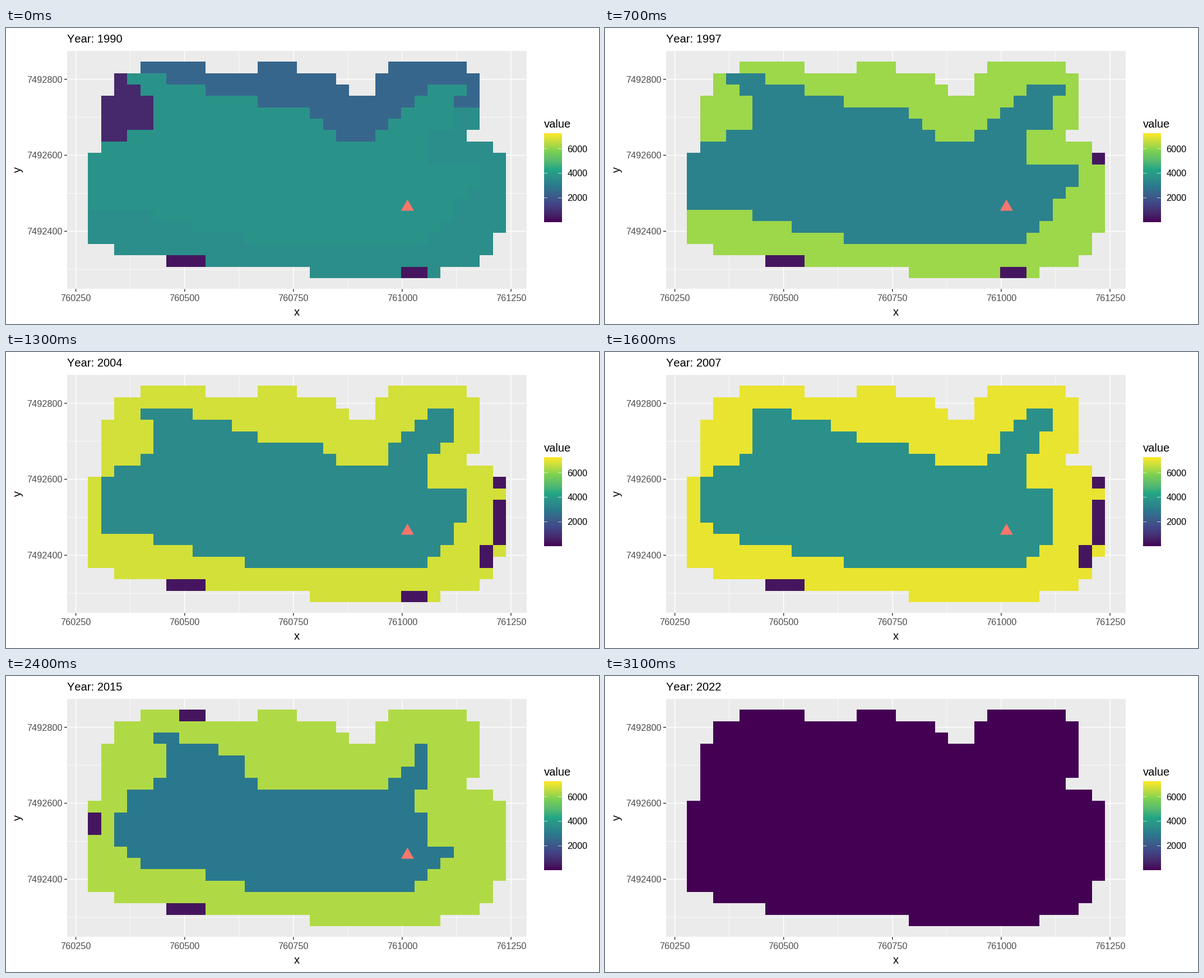
These frames come from a looping animation (1058x529 px, 3.2 s). A matplotlib script:

```python
import numpy as np
import matplotlib.pyplot as plt
from matplotlib.animation import FuncAnimation
from matplotlib.colors import ListedColormap, to_rgb
from matplotlib.patches import Polygon, Rectangle
from matplotlib.path import Path

W, H, DPI = 1058, 529, 100
PT = 72 / DPI  # points per pixel
VMAX = 7225
ROWS, COLS = 19, 32
YEARS = [y for y in range(1990, 2023) if y != 2002]

plt.rcParams["font.family"] = "Liberation Sans"
plt.rcParams["text.kerning_factor"] = 6

# ---- colour scale: viridis stops blended in Lab space ----
STOPS = ["#440154", "#414487", "#2A788E", "#22A884", "#7AD151", "#FDE725"]
TO_XYZ = np.array([[0.4124, 0.3576, 0.1805],
                   [0.2126, 0.7152, 0.0722],
                   [0.0193, 0.1192, 0.9505]])
WHITE = TO_XYZ.sum(axis=1)
TO_LAB = np.array([[0, 116, 0], [500, -500, 0], [0, 200, -200]])


def rgb_to_lab(rgb):
    lin = np.where(rgb > 0.04045, ((rgb + 0.055) / 1.055) ** 2.4, rgb / 12.92)
    t = lin @ TO_XYZ.T / WHITE
    f = np.where(t > 0.008856, np.cbrt(t), 7.787 * t + 16 / 116)
    return f @ TO_LAB.T


def lab_to_rgb(lab):
    f = lab @ np.linalg.inv(TO_LAB).T
    t = np.where(f > 0.2069, f ** 3, (f - 16 / 116) / 7.787)
    lin = np.clip((t * WHITE) @ np.linalg.inv(TO_XYZ).T, 0, 1)
    rgb = np.where(lin > 0.0031308, 1.055 * lin ** (1 / 2.4) - 0.055, 12.92 * lin)
    return np.clip(rgb, 0, 1)


def viridis_ramp(n=1024):
    labs = rgb_to_lab(np.array([to_rgb(c) for c in STOPS]))
    pos = np.linspace(0, 1, len(STOPS))
    t = np.linspace(0, 1, n)
    lab = np.stack([np.interp(t, pos, labs[:, k]) for k in range(3)], axis=1)
    return ListedColormap(lab_to_rgb(lab))


CMAP = viridis_ramp()

# ---- map model, in cell units ----
COL, ROW = np.meshgrid(np.arange(COLS), np.arange(ROWS))
CENTRES = np.column_stack([COL.ravel(), ROW.ravel()]) + 0.5

# Outline of the whole area.
OUTLINE = [
    (0, 8.4), (1, 7.6), (1, 3.4), (2, 2.6), (2, 1.4), (4, 0.3), (9, 0.3),
    (9, 0.9), (13, 0.9), (13, 0.3), (16, 0.3), (16, 0.9), (18.7, 0.9),
    (20.2, 2.9), (22, 2.9), (22, 1.5), (23, 0.3), (28.9, 0.3), (30, 1.5),
    (30, 5.5), (29, 6.5), (31, 7.5), (32, 8.4), (32, 14.5), (30.9, 16.6),
    (30, 17.5), (26.9, 18.6), (18, 18.6), (6.4, 17.5), (2, 16.5), (0, 15.5),
]

# Shore of the core: each point with its place at high and at low level.
SHORE = np.array([
    (0, 8.4, 2, 9.4), (0, 12.6, 2, 11.5), (5, 13.5, 3.9, 13.6),
    (8, 14.5, 9, 14.5), (12, 15.6, 12, 15.6), (26, 15.6, 25, 15.6),
    (28, 13.4, 27, 13.5), (28, 12.4, 28, 12.4), (30, 10.6, 26, 11.6),
    (30, 8.9, 26, 8.9), (26, 8.9, 25, 8.6), (26, 6.4, 25.4, 7.2),
    (28, 5.6, 26, 6.4), (28.8, 1.9, 26, 2.9), (26.4, 1.9, 25, 2.9),
    (24, 4.4, 25, 4.6), (22, 6.9, 23, 6.9), (19.3, 6.9, 19.3, 6.9),
    (16.9, 4.1, 16.6, 6.9), (13, 3.6, 13.1, 6.9), (11, 3.1, 11.8, 4.2),
    (9, 2.6, 10, 3.5), (5.6, 1.2, 6.9, 2.3), (3, 1.2, 5, 2.3),
    (5, 3.5, 6, 3.5), (5, 5.5, 6, 5.5), (1, 7.5, 3.3, 7.6),
])

# Small low patches: first year, last year, column, row, width, height.
PATCHES = [
    (1990, 2021, 6, 17, 3, 1), (1990, 2005, 24, 18, 2, 1),
    (1993, 2012, 31, 8, 1, 1), (1992, 1996, 31, 10, 1, 3),
    (2003, 2012, 31, 10, 1, 4), (2003, 2012, 30, 14, 1, 2),
    (2008, 2021, 7, 0, 2, 1), (2008, 2021, 0, 9, 1, 2),
]

KEY_YEARS = [1990, 1993, 1999, 2007, 2009, 2015]
RIM = [3550, 5780, 6280, 6980, 6748, 6320]
CORE = [3720, 3290, 3140, 3610, 3110, 2900]
DROP = [0, 0, 0.1, 0.4, 0.7, 1]


def inside(points):
    return Path(points).contains_points(CENTRES).reshape(ROWS, COLS)


AREA = inside(OUTLINE)


def year_grid(year):
    if year == YEARS[-1]:
        return np.ma.array(np.zeros((ROWS, COLS)), mask=~AREA)
    rim, core, drop = (np.interp(year, KEY_YEARS, v) for v in (RIM, CORE, DROP))
    wet = inside(SHORE[:, :2] * (1 - drop) + SHORE[:, 2:] * drop)
    grid = np.where(wet, core, rim)
    if year < 1993:
        north = (ROW < 4) | (ROW < 7) & (COL < 24)
        grid[north & ~wet] = np.interp(year, [1990, 1993], [2390, RIM[1]])
    if year < 1997:
        grid[~wet & (COL < 5) & (ROW > 0) & (ROW < 7)] = 720
    for first, last, c, r, w, h in PATCHES:
        if first <= year <= last:
            grid[r:r + h, c:c + w] = 330
    return np.ma.array(grid, mask=~AREA)


# ---- stage, in pixel coordinates with y downwards ----
fig = plt.figure(figsize=(W / DPI, H / DPI), dpi=DPI, facecolor="white")
ax = fig.add_axes([0, 0, 1, 1])
ax.axis("off")

LEFT, RIGHT, TOP, BOTTOM = 109, 929, 40.6, 466.3


def line(xs, ys, color, width, z=1):
    ax.plot(xs, ys, color=color, lw=width * PT, zorder=z, snap=False,
            solid_capstyle="butt")


def label(x, y, s, size=16.2, color="black", ha="left", **kw):
    return ax.text(x, y, s, fontsize=size * PT, color=color, ha=ha,
                   va="baseline", **kw)


def tick_x(i):
    return 124.6 + 194.1 * i


def tick_y(i):
    return 91.7 + 135.8 * i


ax.add_patch(Rectangle((LEFT, TOP), RIGHT - LEFT, BOTTOM - TOP, fc="#EBEBEB",
                       lw=0, zorder=0))
for i in range(4):
    line([tick_x(i + 0.5)] * 2, [TOP, BOTTOM], "white", 0.73)
for i in range(3):
    line([LEFT, RIGHT], [tick_y(i + 0.5)] * 2, "white", 0.73)
for i in range(5):
    x = tick_x(i)
    line([x, x], [TOP, BOTTOM], "white", 1.47, 2)
    line([x, x], [BOTTOM, BOTTOM + 5], "#333333", 1.47)
    label(x, 488, str(760250 + 250 * i), color="#4D4D4D", ha="center")
for i in range(3):
    y = tick_y(i)
    line([LEFT, RIGHT], [y, y], "white", 1.47, 2)
    line([LEFT - 5, LEFT], [y, y], "#333333", 1.47)
    label(100.3, y + 5.9, str(7492800 - 200 * i), color="#4D4D4D", ha="right")

label(518.9, 514.5, "x", 20.2, ha="center")
label(26.5, 253.3, "y", 20.2, ha="center", rotation=90, rotation_mode="anchor")
title = label(109, 26, "", 20.2)

# legend
BAR_X, BAR_W, BAR_TOP, BAR_H = 959.6, 31.7, 188.9, 158.5
label(959.6, 177.5, "value", 20.2)
ax.imshow(np.linspace(VMAX, 0, 300)[:, None], cmap=CMAP, vmin=0, vmax=VMAX,
          extent=(BAR_X, BAR_X + BAR_W, BAR_TOP + BAR_H, BAR_TOP),
          aspect="auto", zorder=3)
for value in (2000, 4000, 6000):
    y = BAR_TOP + BAR_H * (1 - value / VMAX)
    for x in (BAR_X, BAR_X + BAR_W * 0.8):
        line([x, x + BAR_W * 0.2], [y, y], "white", 0.7, 4)
    label(1001.4, y + 5.8, str(value))

# map cells and marker
cells = ax.pcolormesh(np.ceil(145.9 + 23.295 * np.arange(COLS + 1)),
                      np.ceil(59.7 + 20.37 * np.arange(ROWS + 1)),
                      year_grid(YEARS[0]),
                      cmap=CMAP, vmin=0, vmax=VMAX, zorder=5)
marker = ax.add_patch(Polygon([(716.3, 306.6), (704.8, 326.6), (727.8, 326.6)],
                              fc="#F8766D", lw=0, zorder=6))
ax.set_xlim(0, W)
ax.set_ylim(H, 0)


def draw(i):
    year = YEARS[i]
    title.set_text(f"Year: {year}")
    cells.set_array(year_grid(year))
    marker.set_visible(year < YEARS[-1])
    return title, cells, marker


anim = FuncAnimation(fig, draw, frames=len(YEARS), interval=100, repeat=True)
plt.show()
```
